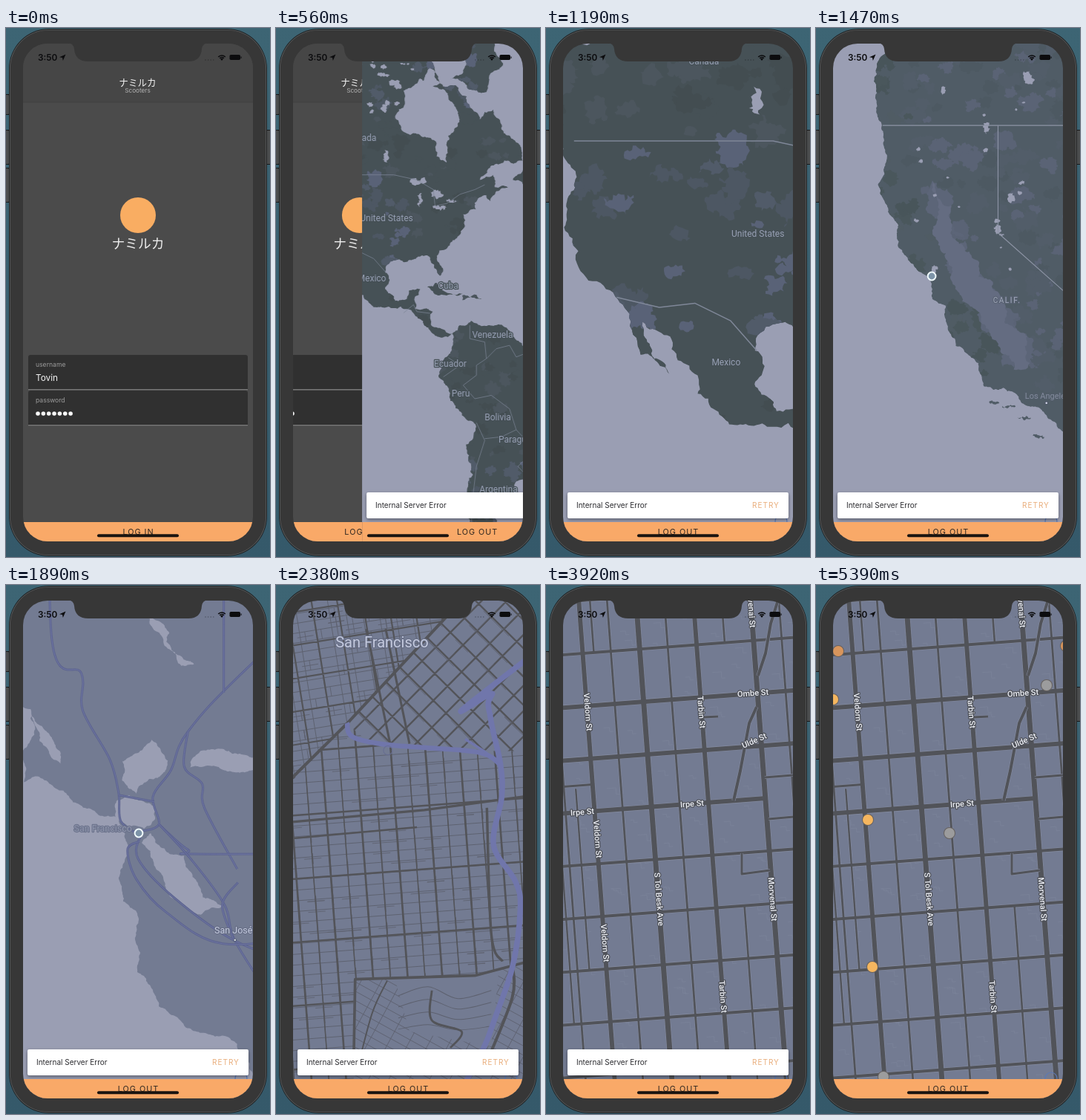
An HTML page with a canvas that plays this animation: 356x712 px, repeating every 5810 ms.

```html
<!DOCTYPE html>
<html lang="en">
<head>
<meta charset="utf-8">
<title>Scooter map</title>
<style>
html, body { margin: 0; width: 100%; height: 100%; overflow: hidden; background: #3d6675; }
canvas { display: block; width: 356px; height: 712px; }
</style>
</head>
<body>
<canvas id="stage" width="356" height="712"></canvas>
<script>
const W = 356, H = 712, LOOP = 5810, TAU = Math.PI * 2;
const stage = document.getElementById('stage').getContext('2d');
const buf = document.createElement('canvas');
buf.width = W; buf.height = H;
const layer = buf.getContext('2d');
let g = stage;

const SEA = '#9a9eb3', LAND = '#465156', CITY = '#737b92', ROAD = '#535459', ORANGE = '#f9a968';
const UI = 'Inter, "Open Sans", sans-serif', MAP = 'Roboto, "Open Sans", sans-serif';
const KANA = '"Noto Sans CJK JP", "Noto Sans CJK", sans-serif';
const BRAND = 'ナミルカ';

// --- numbers ---
const clamp = x => Math.max(0, Math.min(1, x));
const ramp = (x, a, b) => { const u = clamp((x - a) / (b - a)); return u * u * (3 - 2 * u); };

function random(seed) {
  return () => {
    seed = (seed + 0x6d2b79f5) | 0;
    let v = Math.imul(seed ^ (seed >>> 15), 1 | seed);
    v = (v + Math.imul(v ^ (v >>> 7), 61 | v)) ^ v;
    return ((v ^ (v >>> 14)) >>> 0) / 4294967296;
  };
}

// monotone cubic through [time, value] keys
function track(keys, t) {
  const n = keys.length - 1;
  if (t <= keys[0][0]) return keys[0][1];
  if (t >= keys[n][0]) return keys[n][1];
  let i = 0;
  while (t > keys[i + 1][0]) i++;
  const sec = j => (keys[j + 1][1] - keys[j][1]) / (keys[j + 1][0] - keys[j][0]);
  const slope = j => {
    if (j === 0 || j === n) return 0;
    const a = sec(j - 1), b = sec(j);
    return a * b <= 0 ? 0 : 2 * a * b / (a + b);
  };
  const d = keys[i + 1][0] - keys[i][0], u = (t - keys[i][0]) / d, v = 1 - u;
  return keys[i][1] * (1 + 2 * u) * v * v + slope(i) * d * u * v * v
    + keys[i + 1][1] * u * u * (3 - 2 * u) - slope(i + 1) * d * u * u * v;
}

// card easing: cubic-bezier(.2833, .99, .31833, .99)
function cardEase(x) {
  if (x <= 0) return 0;
  if (x >= 1) return 1;
  const f = (s, a, b) => 3 * (1 - s) * (1 - s) * s * a + 3 * (1 - s) * s * s * b + s * s * s;
  let lo = 0, hi = 1;
  for (let i = 0; i < 24; i++) {
    const m = (lo + hi) / 2;
    if (f(m, .2833, .31833) < x) lo = m; else hi = m;
  }
  return f(lo, .99, .99);
}

// --- shapes ---
function poly(p, close = true) {
  const path = new Path2D();
  for (let i = 0; i < p.length; i += 2) path.lineTo(p[i], p[i + 1]);
  if (close) path.closePath();
  return path;
}
// closed outline with fractal detail
function rough(p, amount = .4, least = 3, seed = 4) {
  const rnd = random(seed), out = [];
  const split = (ax, ay, bx, by) => {
    const dx = bx - ax, dy = by - ay, len = Math.hypot(dx, dy);
    if (len < least || len > 300) { out.push(ax, ay); return; }
    const k = (rnd() - .5) * amount, mx = (ax + bx) / 2 - dy * k, my = (ay + by) / 2 + dx * k;
    split(ax, ay, mx, my); split(mx, my, bx, by);
  };
  for (let i = 0; i < p.length; i += 2) {
    const j = (i + 2) % p.length;
    split(p[i], p[i + 1], p[j], p[j + 1]);
  }
  return poly(out);
}
function blob(rnd, x, y, rx, ry) {
  const p = [];
  for (let i = 0; i < 7; i++) {
    const a = i / 7 * TAU, q = .7 + rnd() * .6;
    p.push(x + Math.cos(a) * q * rx, y + Math.sin(a) * q * ry);
  }
  return rough(p, .9, 2.5, Math.floor(rnd() * 1e6));
}
// seeded patches over a box; pick(x, y, i) gives a colour or nothing
function patches(seed, n, [x0, y0, w, h], size, pick) {
  const rnd = random(seed), list = [];
  for (let i = 0; i < n; i++) {
    const x = x0 + rnd() * w, y = y0 + rnd() * h, r = size * (.4 + rnd());
    const shape = blob(rnd, x, y, r, r * (.5 + rnd() * .5)), color = pick(x, y, i);
    if (color) list.push([shape, color]);
  }
  return list;
}
function fill(path, color) { g.fillStyle = color; g.fill(path); }
function stroke(path, color, w) { g.strokeStyle = color; g.lineWidth = w; g.stroke(path); }
const line = (p, color, w) => stroke(poly(p, false), color, w);
const area = (p, color) => fill(poly(p), color);
const fillAll = list => list.forEach(([path, color]) => fill(path, color));
function within(path, draw) { g.save(); g.clip(path); draw(); g.restore(); }

// smooth line through every point
function curve(p, color, w) {
  const path = new Path2D(), n = p.length / 2 - 1;
  const at = (i, k) => p[2 * Math.max(0, Math.min(n, i)) + k];
  path.moveTo(p[0], p[1]);
  for (let i = 0; i < n; i++) {
    const c = [0, 1].map(k => at(i, k) + (at(i + 1, k) - at(i - 1, k)) / 6);
    const d = [0, 1].map(k => at(i + 1, k) - (at(i + 2, k) - at(i, k)) / 6);
    path.bezierCurveTo(...c, ...d, at(i + 1, 0), at(i + 1, 1));
  }
  stroke(path, color, w);
}
function rect(x, y, w, h, r, color) {
  g.beginPath(); g.roundRect(x, y, w, h, r);
  if (color) { g.fillStyle = color; g.fill(); }
}
function disc(x, y, r, color) { g.beginPath(); g.arc(x, y, r, 0, TAU); g.fillStyle = color; g.fill(); }
function ring(x, y, r, color, w) { g.beginPath(); g.arc(x, y, r, 0, TAU); g.strokeStyle = color; g.lineWidth = w; g.stroke(); }
function text(s, x, y, font, color, align = 'left', gap = 0) {
  g.font = font; g.textAlign = align; g.textBaseline = 'middle';
  g.letterSpacing = gap + 'px';
  g.fillStyle = color; g.fillText(s, x, y);
  g.letterSpacing = '0px';
}
function label(s, x, y, size, [color, halo], angle = 0, gap = 0, weight = 400) {
  g.save();
  g.translate(x, y); g.rotate(angle);
  g.font = `${weight} ${size}px ${MAP}`;
  g.textAlign = 'center'; g.textBaseline = 'middle'; g.letterSpacing = gap + 'px';
  g.lineJoin = 'round'; g.lineWidth = 2.4; g.strokeStyle = halo;
  g.strokeText(s, 0, 0);
  g.fillStyle = color; g.fillText(s, 0, 0);
  g.restore();
}

// Mercator: lon/lat pairs to pixels, k pixels per radian, with the camera's goal at x, y
function mercator(k, x, y) {
  const rise = lat => Math.log(Math.tan(Math.PI / 4 + lat * Math.PI / 360));
  return p => p.map((v, i) => i % 2 ? y - (rise(v) - rise(37.77)) * k : x + (v + 122.42) * Math.PI / 180 * k);
}

// --- continents ---
const world = mercator(256, -57, 267);
const NORTH = rough(world([-168,66, -125,71, -95,72, -82,69, -81,64, -73,62.2, -69,58.8, -65,60.3, -62,57, -56,51.7, -66.5,50.1,
  -69,48, -65,49, -64.5,46.5, -60.5,46.4, -65.8,43.5, -67,44.8, -70.6,43.2, -70.2,41.7, -74,40.6, -75.7,35.3, -81.2,31.8,
  -80.1,26.3, -81,25.1, -82.7,28, -84,30, -94,29.4, -97.4,27.5, -97.5,22, -94.5,18.1, -91,18.7, -90.4,21, -87,21.4,
  -88.6,15.8, -83.2,15, -83.7,11, -79.5,9.5, -77.3,8.5, -80.3,7.3, -83,8.4, -87.6,13, -95,16, -105.6,20.4, -105.6,22.8,
  -114.6,31.5, -109.6,23, -115,29.6, -117.2,32.6, -122.4,37.8, -124.4,40.4, -124.5,48.3, -138,59, -168,55]));
const SOUTH = rough(world([-77.3,8.5, -75,11, -71.6,12.3, -68,10.8, -61.8,10.6, -57,6, -51.5,4.2, -50,0, -44,-2.6, -38.5,-3.7,
  -35,-6, -35,-9, -38.8,-13, -39.5,-18, -42,-23, -48.5,-26, -49,-29, -53.5,-34, -58.3,-34.2, -57.6,-38, -62,-39,
  -65,-41, -63.8,-43, -68,-47, -75,-50, -73.5,-38, -71.5,-30, -70.3,-18.4, -76.3,-13.8, -81,-5, -80.5,-1, -77.5,4]));
const ISLES = [
  [-84.8,22, -82,23.2, -74.2,20.2, -77.5,19.9], [-74.2,19.7, -70,19.8, -68.4,18.6, -74.2,18.3],
  [-59,48, -55.6,51.6, -53,48.5, -53,46.7], [-62,66.5, -67,62.8, -78,64.5, -73,66.5, -80,70, -85,73, -68,71], [-87,64, -81,64, -84,66]
].map(p => rough(world(p)));
const GREENLAND = rough(world([-44,59.9, -50,62, -54,67, -53,71, -56,76, -20,76, -24,70, -40,65]), .6);
const BAY = rough(world([-94.5,59, -92,63, -87,64.6, -78.5,62.3, -76.7,57, -79,54.8, -79,51.4, -82,52.5, -82.3,55.2, -92.5,57]));
const LAKES = [[-87.5,47.6,13,5], [-87,43.8,3.5,10], [-82,45,8,6], [-81.2,42.2,9,3], [-77.8,43.6,8,3], [-97.5,52.5,4,9]].map(
  ([lon, lat, rx, ry], i) => blob(random(i), ...world([lon, lat]), rx, ry));
const continents = new Path2D();
[NORTH, SOUTH, ...ISLES].forEach(p => continents.addPath(p));

const RELIEF = patches(7, 520, [-170, -10, 510, 690], 9, (x, y, i) => {
  const pale = y < 110 || (y > 195 && y < 320 && x < 90) || y > 585;
  return pale ? ['#596277', '#515b69', '#4d5763'][i % 3] : ['#434d51', '#465156', '#4c565e'][i % 3];
});
const PONDS = patches(12, 70, [-60, 10, 160, 130], 4, (x, y) => x + y < 190 && SEA);
const BORDERS = [
  [-123,49, -95,49, -88,48, -83,46, -82.5,42.5, -79,43, -75,45, -70.5,46, -67.5,47], [-117,32.5, -111,31.3, -106,31.8, -101,29.7, -97.3,26],
  [-72,11, -72,7, -67.5,6, -67,1, -64,4, -60,5, -58,1.5, -51.5,4], [-92,14.6, -89,17, -88,15, -84,14.5],
  [-67,1, -70,-1, -70,-4, -74,-7, -70.5,-11, -65.5,-10, -60,-14, -58,-20, -54,-24, -54,-27, -57.5,-30, -53.5,-33.5],
  [-78.5,1.3, -75,-1, -80,-4.5], [-70,-18, -67.5,-23, -70,-30, -71,-37, -71.7,-46], [-67.5,-22.5, -62.5,-22, -58,-20]
].map(p => poly(world(p), false));

function drawWorld() {
  fill(GREENLAND, '#6d7899');
  fill(continents, LAND);
  within(continents, () => fillAll(RELIEF));
  [BAY, ...LAKES].forEach(p => fill(p, SEA));
  fillAll(PONDS);
  BORDERS.forEach(p => stroke(p, '#7f8798', .7));
}

// --- west coast ---
const west = mercator(2087, 156, 334);
const COAST = rough(west([-124.1,47, -124.1,44.4, -124.5,42.8, -124.2,41.8, -124.1,41, -124.4,40.4, -123.8,39.4, -123.7,38.9,
  -123,38, -122.5,37.7, -122.4,37.1, -121.9,36.9, -121.9,36.5, -120.7,35.2, -120.5,34.5, -119.2,34.1, -118.4,33.8,
  -117.3,33, -116.8,31.5, -114,27, -90,20, -90,55, -124,55]), .3);
const VALLEY = west([-122.4,40.5, -121.7,39.8, -121.2,38.5, -119.9,37.2, -118.9,36, -118.8,35.2, -119.4,35, -120.6,36.4, -121.7,37.8, -122.2,39.4]);
const FOOTHILLS = rough(VALLEY, .7, 4, 9), PLAIN = rough(VALLEY, .5, 4, 30);
const HILLS = patches(21, 330, [70, -60, 420, 640], 13, (x, y, i) => {
  const shore = x < 125 + Math.max(0, y - 200) * .55;
  return shore ? ['#48555a', '#4a575c', '#505c64'][i % 3] : ['#4d5962', '#525d69', '#5a6375'][i % 3];
});
const TARNS = patches(8, 16, [135, 60, 160, 265], 4, () => SEA);
for (const [x, y, r] of [[285, 68, 9], [172, 85, 6], [230, 136, 7], [262, 228, 7], [244, 272, 6], [160, 324, 5]]) {
  TARNS.push([blob(random(x), x, y, r * .7, r), SEA]);
}

function drawCoast() {
  fill(COAST, '#505c66');
  within(COAST, () => {
    fillAll(HILLS);
    fill(FOOTHILLS, '#5c6578');
    fill(PLAIN, '#646c81');
  });
  fillAll(TARNS);
  for (let i = 0; i < 4; i++) fill(blob(random(i), 240 + i * 20, 504 + i * i * 5, 8, 2), '#505c66');
  line([90, 132, 1400, 132], '#8e95a6', 1.1);
  line([245, 132, 245, 276, 620, 608], '#8e95a6', 1.1);
}

// --- bay area ---
const WATER = [
  [-1500,-500, -60,60, 10,150, 34,168, 40,192, 25,266, 40,258, 78,277, 148,312, 157,325, 158,375, 152,394, 179,450,
    177,520, 206,566, 242,594, 311,616, 336,670, 600,1200, 800,1900, -1500,1900],
  [34,176, 47,190, 74,241, 62,233, 46,211], [157,264, 157,238, 196,209, 218,237, 214,252, 176,281],
  [150,290, 166,283, 201,299, 201,315, 186,328, 148,316], [183,347, 195,334, 240,364, 265,420, 292,431, 262,443, 214,400],
  [248,246, 262,224, 300,224, 400,238, 400,254, 294,250], [192,43, 220,66, 216,78, 253,108, 236,110, 212,78]
].map((p, i) => rough(p, .3, 3, i + 2));
const HIGHWAYS = [
  [62,-300, 62,70, 102,120, 104,170, 140,235, 152,280, 155,318, 180,336], [600,-140, 333,105, 245,198, 222,250, 198,285, 206,322, 180,332],
  [245,198, 240,245, 264,268, 267,300, 311,382], [206,322, 245,356, 275,362, 700,360], [152,283, 200,292],
  [206,322, 250,370, 294,430, 308,478, 360,560], [182,336, 178,368, 226,420, 308,478, 420,520],
  [180,345, 164,356, 176,396, 216,440, 292,482, 420,470], [293,-300, 293,146], [312,400, 291,430, 306,476]
];
function drawBay() {
  base();
  WATER.forEach(p => fill(p, SEA));
  for (const r of HIGHWAYS) { curve(r, '#5d6490', 3); curve(r, '#747ba6', .8); }
}

// --- city ---
function base() { g.fillStyle = CITY; g.fillRect(-3000, -3000, 6400, 6400); }
function grid(angle, x, y, du, dv, w, color = ROAD) {
  const far = 2600, path = new Path2D();
  g.save();
  g.translate(x, y); g.rotate(angle);
  if (du) for (let u = -Math.floor(far / du) * du; u < far; u += du) { path.moveTo(u, -far); path.lineTo(u, far); }
  if (dv) for (let v = -Math.floor(far / dv) * dv; v < far; v += dv) { path.moveTo(-far, v); path.lineTo(far, v); }
  stroke(path, color, w);
  g.restore();
}
// short side streets snapped to a block grid
function lanes(seed, angle, x, y, du, dv, size, count) {
  const rnd = random(seed), path = new Path2D();
  const pick = d => Math.round((rnd() - .5) * size / d) * d;
  g.save();
  g.translate(x, y); g.rotate(angle);
  for (let i = 0; i < count; i++) {
    const u = pick(du), v = pick(dv);
    path.moveTo(u + du / 2, v); path.lineTo(u + du / 2, v + dv);
    if (i % 3 === 0) { path.moveTo(u, v + dv / 2); path.lineTo(u + du, v + dv / 2); }
  }
  stroke(path, THIN, .8);
  g.restore();
}
const THIN = '#5d616f';
const UPPER = poly([-1400,1740, 96,187, 1700,-1500, -1500,-1500]);
const DIAGONAL = poly([96,187, 1700,-1500, 1700,200, 300,224, 125,212]);
const LOWER = poly([105,530, 268,525, 333,508, 1700,480, 1700,2400, 105,2400]);

function drawCity() {
  const tilt = -.075;
  base();
  grid(tilt, 68, 307, 23.2, 14.3, .9, THIN);
  lanes(3, tilt, 179, 380, 23.2, 14.3, 420, 330);
  grid(tilt, 68, 307, 23.2, 0, 1.5);
  grid(tilt, 68, 307, 46.4, 85, 2.6);
  line([-400, 360, 23, 319, 200, 303, 333, 285, 800, 245], ROAD, 3.2);
  line([-400, 380, 23, 341, 190, 326], ROAD, 2.6);
  within(UPPER, () => {
    base();
    grid(-.16, 60, 100, 22, 13, .9, THIN);
    lanes(9, -.16, 80, 110, 22, 13, 320, 130);
    grid(-.16, 124, 66, 34, 44, 2.2);
  });
  within(DIAGONAL, () => {
    base();
    grid(-.79, 214, 120, 27, 24, 2.4);
    lanes(5, -.79, 230, 120, 27, 24, 330, 110);
  });
  for (const x of [122, 148]) line([x, 60, x + 32, 214], ROAD, 3);
  within(LOWER, () => {
    base();
    grid(.5, 160, 600, 24, 11, .8, THIN);
    area([160, 528, 300, 518, 290, 620, 180, 600], CITY);
    for (let i = 0; i < 4; i++) curve([165, 552 + i * 15, 205, 540 + i * 17, 245, 556 + i * 14, 290, 545 + i * 16], THIN, 1);
    curve([150, 532, 130, 575, 110, 650], ROAD, 2);
    curve([210, 545, 210, 585, 250, 600, 235, 622], ROAD, 2.8);
  });
  line([-1400, 1740, 23, 259, 96, 187, 250, 22, 1700, -1500], ROAD, 4);
  line([105, 640, 107, 530, 268, 525, 333, 508, 900, 470], ROAD, 3.6);
  curve([284, 300, 290, 470, 305, 506], ROAD, 3.4);
  curve([318, 510, 318, 555, 280, 650], ROAD, 4);
  const way = '#7076ab';
  curve([96, 186, 104, 205, 155, 216, 270, 225, 303, 243], way, 6.5);
  curve([255, 208, 280, 224, 300, 240], way, 3.5);
  curve([1400, -700, 345, 95, 291, 148, 289, 180, 302, 240, 304, 285, 293, 350, 322, 398, 329, 435, 318, 515, 288, 602, 200, 860, 160, 1600], way, 7.5);
  ring(151, 223, 6, '#666d92', 1);
}

// --- streets ---
function drawStreets() {
  const rnd = random(14), edge = '#858ca1', far = 1200, net = [];
  const down = (x, w, top = -far, end = far) => net.push([poly([x, top, x, end], false), w]);
  const across = (y, w, end = far) => net.push([poly([-far, y, end, y], false), w]);
  const paint = list => {
    list.forEach(([p, w]) => stroke(p, edge, w + 1.2));
    list.forEach(([p, w]) => stroke(p, '#515359', w));
  };
  base();
  g.save();
  g.translate(179, 334); g.rotate(-.075);
  const plots = new Path2D();
  for (let i = 0; i < 130; i++) {
    const x = -190 + Math.floor(rnd() * 10) * 38.5 + 8 + rnd() * 16, y = -330 + rnd() * 670, s = 4 + rnd() * 9;
    plots.moveTo(x, y); plots.lineTo(x + s, y); plots.lineTo(x + s, y + s * .7); plots.lineTo(x + s + 5, y + s * .7);
  }
  stroke(plots, '#7c849a', .7);
  for (let i = -12; i <= 14; i++) {
    const x = 77 * i - 111;
    down(x, i % 2 ? 7 : 6);
    if (i !== 2) down(x + 38, 2.8);
  }
  down(81, 2.6, -far, -252); down(81, 2.6, 104); down(-96, 2.6, -far, -252);
  down(-134, 2.4, -70, 175); down(-160, 2.4, 33, 246);
  for (let j = -14; j <= 16; j++) across(71 * j - 180, j >= 0 && j <= 2 ? 6 : 4, j === 2 ? 117 : far);
  across(-74, 3, -111);
  paint(net);
  g.restore();
  paint([
    [poly([253, 290, 262, 250, 274, 186, 284, 164], false), 4], [poly([286, 122, 296, 92, 303, 52, 313, 20], false), 4],
    [poly([295, 259, 345, 255], false), 3], [poly([300, 315, 345, 311], false), 3],
    [poly([264, 361, 264, 389, 302, 384], false), 3], [poly([212, 178, 232, 177], false), 3]
  ]);
}

// --- camera ---
const ZOOM = [[910, 5.545], [1470, 7.64], [1890, 9.575], [2380, 13.3], [2950, 14.5]];
const PAN_X = [[910, -57], [1470, 156], [1890, 179]];
const PAN_Y = [[910, 267], [1470, 334]];
const PALE = ['#97a0b4', '#465056'], DIM = ['#838b9d', '#525d69'], FAINT = ['#8e95ac', '#6c738c'], CLEAR = ['#c4cade', '#686f87'];
// labels: text, x, y, colours, size, letter gap
const LEVELS = [
  { z: 5.545, x: -57, y: 267, show: [0, 1], hide: 7.4, draw: drawWorld, labels: [
    ['Canada', 22, 148, PALE], ['United States', 56, 256, PALE], ['Mexico', 36, 337, PALE], ['Cuba', 139, 347, PALE],
    ['Venezuela', 199, 413, PALE], ['Ecuador', 142, 452, PALE], ['Peru', 156, 492, PALE], ['Brazil', 262, 490, PALE],
    ['Bolivia', 206, 524, PALE], ['Paraguay', 232, 554, PALE], ['Argentina', 207, 621, PALE]] },
  { z: 7.64, x: 156, y: 334, show: [6.9, 7.4], hide: 9.1, draw: drawCoast, town: [310, 504], labels: [
    ['CALIF.', 257, 367, ['#a0a8b9', '#5a6374'], 10, 1.6], ['Los Angeles', 311, 495, DIM, 11]] },
  { z: 9.575, x: 179, y: 334, show: [8.5, 9.1], hide: 12.4, draw: drawBay, town: [308, 477], labels: [
    ['San Francisco', 131, 328, FAINT, 12.5], ['San José', 306, 465, CLEAR, 12.5]] },
  { z: 13.3, x: 179, y: 334, show: [11.3, 12.4], hide: 14.2, draw: drawCity, labels: [['San Francisco', 143, 79, CLEAR, 20]] },
  { z: 14.5, x: 179, y: 334, show: [13.5, 14.2], hide: 99, draw: drawStreets, labels: [] }
];

const DOWN = Math.PI / 2 - .075, FLAT = -.075;
// text, x, y, angle, fades out later
const STREETS = [
  ['Veldorn St', 56, 171, DOWN], ['Veldorn St', 69, 342, DOWN, true], ['Veldorn St', 79, 482, DOWN, true],
  ['Tarbin St', 209, 171, DOWN], ['Tarbin St', 238, 554, DOWN], ['Morvenal St', 305, 423, DOWN], ['Morvenal St', 276, 28, DOWN],
  ['S Tol Besk Ave', 152, 423, DOWN], ['Ombe St', 279, 146, FLAT], ['Ulde St', 281, 210, -.42],
  ['Irpe St', 49, 306, FLAT, true], ['Irpe St', 197, 295, FLAT]
];
const GREY = '#9c9c9d', AMBER = '#f5b65f', RUST = '#d8955c';
const SCOOTERS = [[30, 89, RUST], [23, 154, AMBER], [311, 135, GREY], [337, 82, RUST], [70, 316, AMBER], [180, 334, GREY],
  [76, 514, AMBER], [91, 662, GREY]];

function drawLevel(lv, z, tx, ty) {
  const k = Math.exp(z - lv.z), at = (x, y) => [tx + (x - lv.x) * k, ty + (y - lv.y) * k];
  g.setTransform(1, 0, 0, 1, 0, 0);
  g.fillStyle = SEA; g.fillRect(0, 0, W, H);
  g.setTransform(k, 0, 0, k, ...at(0, 0));
  g.lineJoin = 'round';
  lv.draw();
  g.setTransform(1, 0, 0, 1, 0, 0);
  for (const [s, x, y, tint, size = 12, gap = 0] of lv.labels) label(s, ...at(x, y), size, tint, 0, gap);
  if (lv.town) { disc(...at(...lv.town), 2.2, '#4c5468'); disc(...at(...lv.town), 1.3, '#d5d9e6'); }
}

function drawMap(t) {
  const z = track(ZOOM, t), tx = track(PAN_X, t), ty = track(PAN_Y, t);
  for (const lv of LEVELS) {
    const alpha = ramp(z, ...lv.show);
    if (!alpha || z > lv.hide) continue;
    const screen = g;
    g = layer;
    drawLevel(lv, z, tx, ty);
    g = screen;
    g.globalAlpha = alpha;
    g.drawImage(buf, 0, 0);
    g.globalAlpha = 1;
  }
  g.globalAlpha = ramp(z, 6.6, 7.2) * (1 - ramp(z, 10.5, 11.5));
  disc(tx, ty, 5.4, '#7d94a8');
  ring(tx, ty, 5.4, '#f0fafc', 2);
  for (const [s, x, y, a, later] of STREETS) {
    g.globalAlpha = later ? ramp(t, 3640, 3920) * (1 - ramp(t, 4620, 5040)) : ramp(t, 3150, 3500);
    if (g.globalAlpha) label(s, x, y, 11, ['#eceef4', '#4d5058'], a, 0, 500);
  }
  g.globalAlpha = ramp(t, 4480, 4900);
  for (const [x, y, c] of SCOOTERS) { disc(x, y, 8, '#66615f'); disc(x, y, 7, c); }
  g.globalAlpha = 1;
  ring(317, 664, 8, '#5c78b4', 1.2);
}

// --- screens ---
function button(s, alpha) {
  g.fillStyle = '#4b4b4b'; g.fillRect(23, 665, 310, 26);
  g.globalAlpha = alpha;
  g.fillStyle = ORANGE; g.fillRect(23, 665, 310, 26);
  text(s, 178.5, 678.5, `400 10.8px ${UI}`, '#2e2620', 'center', 1);
  g.globalAlpha = 1;
}

function drawLogin(t) {
  g.fillStyle = '#4b4b4b'; g.fillRect(23, 21, 310, 670);
  g.fillStyle = '#464646'; g.fillRect(23, 21, 310, 79);
  g.fillStyle = '#3f3f3f'; g.fillRect(23, 99.5, 310, .8);
  text(BRAND, 177.5, 73, `400 12.6px ${KANA}`, '#f4f4f4', 'center');
  text('Scooters', 177.5, 84.5, `400 8.2px ${UI}`, '#b4b4b4', 'center');
  disc(178, 252, 24, '#f9ad62');
  text(BRAND, 178, 290, `400 17.8px ${KANA}`, '#ededed', 'center');
  [440, 488].forEach((y, i) => {
    rect(30, y, 296, 47, [3, 3, 0, 0], '#303030');
    g.fillStyle = '#8c8c8c'; g.fillRect(30, y + 46.2, 296, 1);
    text(i ? 'password' : 'username', 40, y + 13.5, `400 8.6px ${UI}`, '#9c9c9c');
  });
  text('Tovin', 40, 471.5, `400 11.8px ${UI}`, '#f4f4f4');
  for (let i = 0; i < 7; i++) disc(43 + i * 7.35, 519, 2.8, '#f8f8f8');
  button('LOG IN', 1 - .5 * Math.sin(Math.PI * clamp((t - 70) / 350)));
}

function drawSnack(t) {
  const out = ramp(t, 3990, 4410);
  if (out === 1) return;
  g.save();
  g.globalAlpha = 1 - out;
  g.shadowColor = 'rgba(0,0,0,.4)'; g.shadowBlur = 5; g.shadowOffsetY = 2;
  rect(29, 625, 298, 35, 2, '#fff');
  g.shadowColor = 'transparent';
  text('Internal Server Error', 41, 642.5, `400 10px ${UI}`, '#2c2c30');
  text('RETRY', 278, 642.5, `400 10px ${UI}`, '#e9ae7c', 'left', 1);
  g.restore();
}

function drawStatus() {
  const ink = '#0c0c0e';
  text('3:50', 43, 40.5, `600 11.8px ${UI}`, ink);
  area([80.5, 35.5, 76.8, 44, 76, 40, 72, 39.2], ink);
  for (let i = 0; i < 4; i++) disc(269 + i * 3.6, 43, .8, 'rgba(12,12,14,.35)');
  g.strokeStyle = ink; g.lineWidth = 1.5;
  for (const r of [3.9, 6.6]) {
    g.beginPath(); g.arc(291, 43.5, r, -Math.PI * .76, -Math.PI * .24); g.stroke();
  }
  area([291, 44, 289, 41.6, 291, 40.7, 293, 41.6], ink);
  rect(301.5, 36, 14.5, 7, 1.8, ink);
  rect(316.6, 38.3, 1, 2.6, .5, ink);
}

function drawPhone() {
  const bg = g.createLinearGradient(0, 0, 0, H);
  bg.addColorStop(0, '#3d6574'); bg.addColorStop(1, '#35596a');
  g.fillStyle = bg; g.fillRect(0, 0, W, H);
  for (const [x, y, h] of [[-3, 89, 28], [-3, 137, 47], [-3, 188, 47], [351, 137, 47]]) {
    rect(x, y, 8, h, 1, '#17191a');
    rect(x, y + 1, 7, h - 2, 1, '#4b4d4e');
  }
  ['#1d1f20', '#5a5c5d', '#373737'].forEach((c, i) => rect(4 + i * .9, 1 + i * .9, 348 - i * 1.8, 710 - i * 1.8, 54 - i, c));
}
function drawNotch() {
  g.beginPath();
  g.moveTo(84, 20); g.quadraticCurveTo(91, 21, 92, 28);
  g.quadraticCurveTo(93, 45, 111, 45); g.lineTo(246, 45);
  g.quadraticCurveTo(263, 45, 264, 28); g.quadraticCurveTo(265, 21, 272, 20);
  g.fillStyle = '#373737'; g.fill();
}

function render(t) {
  const p = cardEase((t - 420) / 600);
  drawPhone();
  g.save();
  rect(23, 21, 310, 670, 33); g.clip();
  if (p < 1) {
    g.save(); g.translate(-93 * p, 0); drawLogin(t); g.restore();
  }
  if (p > 0) {
    g.save();
    g.translate(310 * (1 - p), 0);
    g.beginPath(); g.rect(23, 21, 310, 670); g.clip();
    drawMap(t);
    drawSnack(t);
    button('LOG OUT', 1);
    g.restore();
  }
  drawStatus();
  rect(123, 681.3, 110, 4, 2, '#1a1410');
  g.restore();
  drawNotch();
}

const start = performance.now();
function tick() {
  render((performance.now() - start) % LOOP);
  requestAnimationFrame(tick);
}
tick();
</script>
</body>
</html>
```
